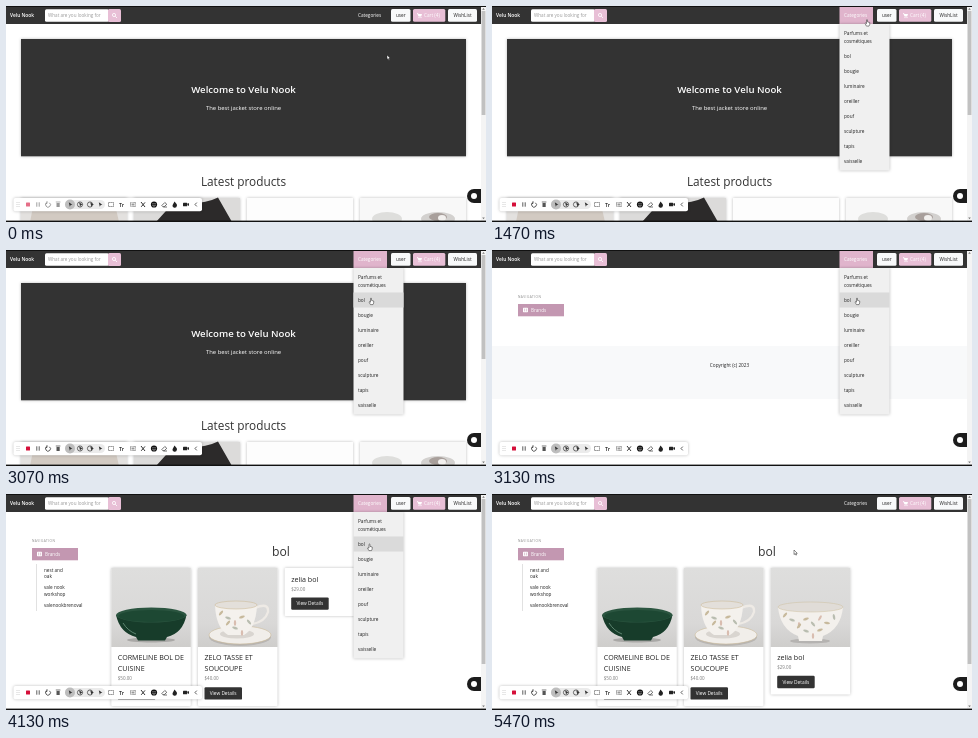
An HTML page for the animation above (5.67 s loop, 480 by 216 pixels).

```html
<!DOCTYPE html>
<html lang="en">
<head>
<meta charset="utf-8">
<title>Shop demo</title>
<style>
  html, body { margin: 0; width: 100%; height: 100%; overflow: hidden; background: #fff; }
  svg { display: block; width: 100vw; height: 100vh; font-family: "Open Sans", "Noto Sans", sans-serif; }
  .soft { filter: drop-shadow(0 .6px 1.4px #0004); }
</style>
</head>
<body>
<svg id="stage" viewBox="0 0 480 216"></svg>
<script>
const STORE = "Velu Nook";
const DARK = "#333", PINK = "#e8bfd6", MAUVE = "#c397b1";

const rect = (x, y, w, h, fill, more = "") =>
  `<rect x="${x}" y="${y}" width="${w}" height="${h}" fill="${fill}" ${more}/>`;
const ellipse = (x, y, rx, ry, fill, more = "") =>
  `<ellipse cx="${x}" cy="${y}" rx="${rx}" ry="${ry}" fill="${fill}" ${more}/>`;
const path = (d, fill, more = "") => `<path d="${d}" fill="${fill}" ${more}/>`;
const line = (d, color = DARK, width = .8) => path(d, "none", `stroke="${color}" stroke-width="${width}"`);
const text = (x, y, s, size, fill = "#222", more = "") =>
  `<text x="${x}" y="${y}" font-size="${size}" fill="${fill}" ${more}>${s}</text>`;
const group = (id, body, more = "") => `<g id="${id}" ${more}>${body}</g>`;
const MID = 'text-anchor="middle"', BOLD = 'font-weight="600"';

function navbar() {
  return rect(0, 0, 475, 18, DARK) + rect(0, 0, 480, 1, "#111")
    + text(4, 11.4, STORE, 4.9, "#fff", BOLD)
    + rect(39, 3.3, 64, 12.4, "#fff", 'rx="1.5"')
    + text(42, 11.3, "What are you looking for", 4.6, "#999")
    + rect(102, 3, 13, 13, PINK, 'rx="1.5"')
    + `<circle cx="108" cy="9" r="1.6" fill="none" stroke="#fff" stroke-width=".8"/>` + line("M109.2 10.2l1.8 1.8", "#fff")
    + group("hot", rect(347.5, 1, 33.5, 17, "#e0b4cc"))
    + text(352, 11.3, "Categories", 4.7, "#fff")
    + rect(385, 3, 19.5, 12.7, "#f8f9fa", 'rx="1.5"') + text(394.8, 11.3, "user", 4.7, "#222", MID)
    + rect(407, 3, 32.3, 12.7, PINK, 'rx="1.5"')
    + path("M411 7h1l.4 1h3.6l-.8 2.6h-2.6z", "#fff") + ellipse(413, 11.6, .6, .6, "#fff") + ellipse(415, 11.6, .6, .6, "#fff")
    + text(418, 11.3, "Cart (4)", 4.7, "#fff")
    + rect(442, 3, 29, 12.7, "#f8f9fa", 'rx="1.5"') + text(456.5, 11.3, "WishList", 4.7, "#222", MID);
}

const scrollbar = end => rect(475.6, 5, 3.8, end - 5, "#c1c1c1");

function home() {
  return rect(15, 33, 445, 117.3, DARK, 'class="soft"')
    + text(237.5, 87.4, `Welcome to ${STORE}`, 9.65, "#fff", MID + BOLD.padStart(20))
    + text(237.5, 104, "The best jacket store online", 5.9, "#fff", MID)
    + text(237.5, 179.7, "Latest products", 11.8, DARK, MID)
    + [15, 128, 241, 354].map((x, i) =>
        rect(x, 192, 106, 30, ["#e3e1df", "#dcdbda", "#fdfdfd", "#f8f8f8"][i], 'class="soft"')).join("")
    + path("M24 216L28 196Q70 205 108 194L113 216z", "#d2cac2")
    + path("M150 216L168 196Q195 200 212 191.5L226 216z", "#2c2a2a")
    + ellipse(381, 213, 15, 7, "#dededc") + ellipse(432, 213, 17, 7, "#d3d1cf")
    + ellipse(432, 211, 9, 4, "#a89f9b") + ellipse(436, 212, 4, 3, "#f2f0ee")
    + scrollbar(109);
}

function sidebar() {
  return text(26, 48.3, "NAVIGATION", 3.2, "#888", 'letter-spacing=".45"')
    + rect(26, 54, 46, 12.3, MAUVE)
    + rect(31, 57.8, 5, 4.4, "#fff", 'rx=".6"') + line("M32 59.2h1.2M34 59.2h1.2M32 60.8h1.2M34 60.8h1.2", MAUVE, .7)
    + text(39, 61.8, "Brands", 4.6, "#fff");
}

const loading = () => rect(0, 96, 475, 53, "#f8f9fa") + text(237.5, 116.6, "Copyright (c) 2023", 4.7, "#222", MID);

// Card text, placed relative to the bottom of its picture
function cardBody(x, y, title, price) {
  const low = y + 11.4 * (title.length - 1);
  return title.map((s, i) => text(x + 6.5, y + 13 + 11.4 * i, s, 7.1, "#222")).join("")
    + text(x + 6.5, low + 22, price, 4.5, "#777")
    + rect(x + 6.5, low + 28.8, 37.5, 12.4, DARK, 'rx="1.2"')
    + text(x + 25.2, low + 36.7, "View Details", 4.8, "#fff", MID);
}
const card = (x, y, h) => rect(x, y, 79.5, h, "#fff", 'rx="1" class="soft"');
const picture = x => rect(x, 74, 79.5, 79, "url(#wall)");

const leaves = (x, y, n) => Array.from({ length: n }, (_, i) => {
  const a = x + i * 7, b = y + (i * 5) % 11;
  return ellipse(a, b, 3, 1.2, ["#c7b99c", "#b9bdb0", "#d9bdb0"][i % 3], `transform="rotate(${i * 70 - 50} ${a} ${b})"`);
}).join("");

const greenBowl = () => ellipse(145, 146, 24, 2.5, "#a9a8a6")
  + path("M110 121Q114 139 130 143L132 146.5H159L161 143Q177 139 180.5 121z", "#173c2a")
  + ellipse(145.3, 121, 35.3, 7.5, "#2b5540") + ellipse(145.3, 122, 33, 6, "#1d4833")
  + line("M117 129Q122 137 130 140", "#5d8570", 1);

const teaCup = () => ellipse(234, 143, 31, 9, "#b9b6b3") + ellipse(234, 141, 31, 9, "#f1eeea", 'stroke="#c9b58f" stroke-width=".5"')
  + ellipse(231, 140, 17, 4.5, "#d9d5d0")
  + line("M249 114Q263 108 262 118Q259 128 246 130", "#eeeae5", 2.4)
  + path("M209 111Q210 134 222 141H238Q250 134 251 111z", "#f4f1ed")
  + ellipse(230, 111, 21, 4, "#e3dfda", 'stroke="#c9b58f" stroke-width=".5"')
  + leaves(215, 119, 5) + leaves(222, 129, 3);

const paleBowl = () => ellipse(318, 147, 20, 2.5, "#b5b3b1")
  + path("M286 113Q288 135 306 142L307 147H330L331 142Q349 135 351 113z", "#f3f0ec")
  + ellipse(318.5, 113, 32.5, 5, "#e0dcd7", 'stroke="#cdbf9f" stroke-width=".5"')
  + leaves(293, 121, 8) + leaves(307, 132, 4);

function products() {
  const brands = [[76, "nest and"], [82.6, "oak"], [93.5, "vale nook"], [100, "workshop"], [111, "valenookbrenoval"]];
  return rect(30, 70, .7, 47, "#d5d5d5")
    + brands.map(([y, s]) => text(38, y + 1.6, s, 4.65)).join("")
    + text(275, 62.3, "bol", 12.2, DARK, MID)
    + card(105.3, 74, 138) + picture(105.3) + greenBowl() + cardBody(105.3, 153, ["CORMELINE BOL DE", "CUISINE"], "$50.00")
    + card(192, 74, 138) + picture(192) + teaCup() + cardBody(192, 153, ["ZELO TASSE ET", "SOUCOUPE"], "$40.00")
    + group("short", card(278.7, 74, 48) + cardBody(278.7, 74.6, ["zelia bol"], "$29.00"))
    + group("full", card(278.7, 74, 126.5) + picture(278.7) + paleBowl() + cardBody(278.7, 153, ["zelia bol"], "$29.00"))
    + scrollbar(170);
}

function menu() {
  const items = ["bol", "bougie", "luminaire", "oreiller", "pouf", "sculpture", "tapis", "vaisselle"];
  return rect(347.5, 18, 50, 146.5, "#f0f0f0", 'class="soft"')
    + `<rect id="row" x="347.5" width="50" fill="#dadada"/>`
    + text(352, 29, "Parfums et", 4.7) + text(352, 36.6, "cosmétiques", 4.7)
    + items.map((s, i) => text(352, 51.6 + 15 * i, s, 4.7)).join("");
}

function toolbar() {
  const y = 198.5;
  const pointer = x => path(`M${x - 1.2} ${y - 2.2}l3.6 2.4l-1.7.4l-.9 1.6z`, DARK);
  const ring = x => `<circle cx="${x}" cy="${y}" r="2.6" fill="none" stroke="${DARK}" stroke-width=".7"/>`;
  const box = (x, dash) => rect(x - 2.5, y - 2, 5, 4, "none", `stroke="${DARK}" stroke-width=".7" stroke-dasharray="${dash}"`);
  return rect(7.5, 192, 188.5, 13.2, "#fff", 'rx="2" class="soft"')
    + line("M11 196v5M13 196v5", "#aaa", .7).replace("/>", ' stroke-dasharray=".8 1.2"/>')
    + group("rec", rect(20, 196.5, 4, 4, "#d5103a", 'rx=".5"')
      + line("M30.8 196.3v4.4M33.2 196.3v4.4")
      + line("M41 196.6a2.4 2.4 0 1 0 2.4 .2M41 195.2v2.2h-1.6")
      + rect(50.5, 197, 3.2, 4, "#555") + line("M49.8 196h4.6", "#555"))
    + rect(59, 194, 40, 9, "#ebebeb", 'rx="4.5"') + ellipse(64, y, 5, 5, "#bdbdbd") + pointer(64)
    + ring(74) + pointer(74.3) + ring(84) + pointer(85.5) + pointer(94)
    + box(105, "1.2 .8") + text(113, 200.6, "Tr", 5.4, "#222", BOLD) + box(127, ".6 .6") + rect(125.5, 197.5, 3, 2, "#999")
    + line("M135 196l4 5M135.2 200.8l3.8-4.4", DARK, 1)
    + ellipse(148, y, 3.1, 3.1, "#111") + ellipse(147, 197.7, .5, .5, "#fff") + ellipse(149, 197.7, .5, .5, "#fff") + line("M146.4 199.3q1.6 1.8 3.2 0", "#fff", .6)
    + line("M155.8 199.5l3-3l2 1.8l-2.6 2.4h-1.4zM157.5 201h3.5", DARK, .7)
    + path("M168.5 195.6q3 3 2.4 4.2a2.2 2.2 0 0 1-4.4-.6z", "#222")
    + rect(177, 196.7, 4.2, 3.6, "#222", 'rx=".6"') + path("M181.4 198l1.6-1v3l-1.6-1z", "#222")
    + line("M190.8 196.6l-1.8 1.9l1.8 1.9");
}

const stage = document.getElementById("stage");
stage.innerHTML =
  `<defs><linearGradient id="wall" x2="0" y2="1"><stop stop-color="#dededd"/><stop offset=".7" stop-color="#d9d8d7"/><stop offset="1" stop-color="#cecdcb"/></linearGradient></defs>`
  + rect(0, 0, 480, 216, "#fff") + rect(475, 1, 5, 215, "#f4f4f4")
  + group("home", home()) + group("side", sidebar()) + group("loading", loading()) + group("products", products())
  + navbar() + path("M477.5 2l1.3 1.8h-2.6z", "#777") + path("M477.5 213.2l1.3-1.8h-2.6z", "#777")
  + group("menu", menu())
  + group("badge", path("M475 183h-7a7 7 0 0 0 0 14h7z", "#1c1c1c") + ellipse(468, 190, 3, 3, "#fff"))
  + toolbar() + rect(0, 214.6, 480, 1.4, "#111")
  + group("arrow", path("M0 0V4.6L1.1 3.6L1.9 5.2L2.6 4.9L1.9 3.3H3.3z", "#fff", 'stroke="#222" stroke-width=".5"'))
  + group("hand", path("M-.5 .3Q0-.3 .5 .3V2.4L2.7 3V5L2 6.6H-.6L-2 4L-1.4 3.5L-.5 4.2z", "#fff", 'stroke="#222" stroke-width=".5"'));

const el = id => document.getElementById(id);
const show = (id, on) => el(id).setAttribute("visibility", on ? "inherit" : "hidden");

// Pointer path: step, x, y
const route = [[0, 381, 49], [6, 387, 12], [9, 387, 23], [11, 387, 19], [20, 387, 19], [22, 375, 13.5], [25, 373.5, 13.5],
  [31, 373.5, 13], [39, 364.8, 47], [40, 364.8, 47], [43, 365, 48], [61, 365, 48], [62, 363.5, 50], [70, 355, 54],
  [74, 355, 54], [82, 302, 56], [85, 302, 56]];

function pointerAt(n) {
  const i = Math.max(1, route.findIndex(k => k[0] >= n));
  const [n0, x0, y0] = route[i - 1], [n1, x1, y1] = route[i];
  const p = (n - n0) / (n1 - n0);
  return [x0 + (x1 - x0) * p, y0 + (y1 - y0) * p];
}

const LOOP = 5670, STEP = 1000 / 15;

function draw(now) {
  const n = Math.min(84, Math.floor((now % LOOP + 4) / STEP));
  const [x, y] = pointerAt(n);
  const open = n >= 22 && n < 76;
  show("home", n < 47);
  show("side", n >= 47);
  show("loading", n >= 47 && n < 62);
  show("products", n >= 62);
  show("short", n === 62);
  show("full", n > 62);
  show("hot", open);
  show("menu", open);
  show("badge", n !== 54);
  el("rec").setAttribute("opacity", n < 4 ? .6 : 1);

  const onBol = y >= 42.5;
  el("row").setAttribute("y", onBol ? 42.5 : 20);
  el("row").setAttribute("height", onBol ? 15 : 22.5);
  show("row", open && y > 20);

  show("hand", open);
  show("arrow", !open);
  for (const id of ["hand", "arrow"]) el(id).setAttribute("transform", `translate(${x} ${y})`);
  requestAnimationFrame(draw);
}

// Nested groups inherit visibility, so child toggles must not override a hidden parent
const baseShow = show;
draw(performance.now());
</script>
</body>
</html>
```
